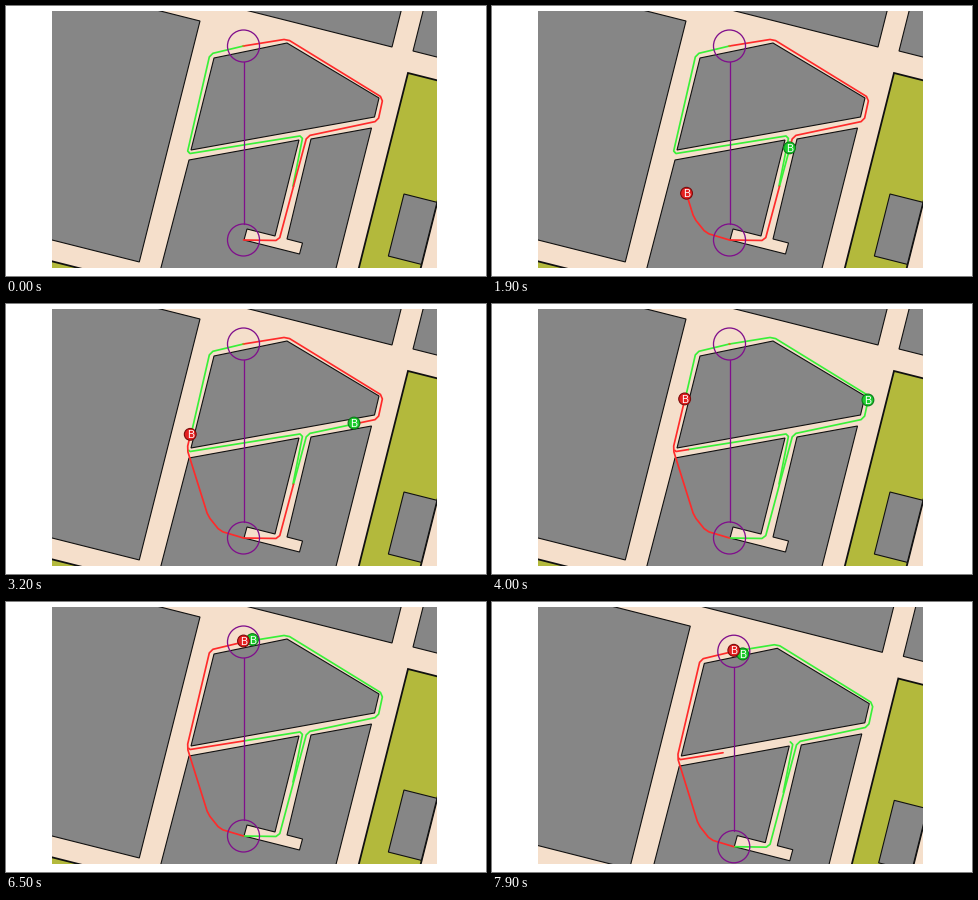
A matplotlib script that plays this animation: 480 by 270 pixels, repeating every 8 s.

```python
import numpy as np
import matplotlib.pyplot as plt
from matplotlib.animation import FuncAnimation
from matplotlib.patches import Circle, Polygon

W, H, DPI = 480, 270, 100
FRAMES, STEP = 80, 100
PX = 72 / DPI
LEFT, RIGHT, TOP, BOTTOM = 45.5, 430.5, 4.5, 262

ROAD, GRAY, OLIVE = "#f5dfcb", "#868686", "#b3b93c"
RED, GREEN, PURPLE = "#ff2a2a", "#38f038", "#800f8c"

# Seconds and pixels per second
START, REPAINT, PAN_START, PAN_TIME = 0.4, 3.6, 7.5, 0.4
RED_SPEED, SPUR_SPEED, SPUR_START = 45.5, 18, 3.2

# Axes of the tilted city grid
ANGLE = np.arctan(0.252)
EAST = np.array([np.cos(ANGLE), np.sin(ANGLE)])
SOUTH = np.array([-EAST[1], EAST[0]])


class Route:
    """Polyline with cut corners, addressed by distance from its start."""

    def __init__(self, corners, cut=3):
        corners = np.array(corners, float)
        points = [corners[0]]
        for before, corner, after in zip(corners, corners[1:], corners[2:]):
            for other in (before, after):
                way = other - corner
                points.append(corner + way * cut / np.hypot(*way))
        self.points = np.array(points + [corners[-1]])
        steps = np.hypot(*np.diff(self.points, axis=0).T)
        self.dist = np.concatenate([[0], np.cumsum(steps)])
        self.length = self.dist[-1]

    def at(self, d):
        return np.array([np.interp(d, self.dist, c) for c in self.points.T])

    def find(self, point):
        ds = np.linspace(0, self.length, 1500)
        x, y = self.at(ds)
        return ds[np.argmin(np.hypot(x - point[0], y - point[1]))]

    def part(self, a, b):
        inner = self.dist[(self.dist > a) & (self.dist < b)]
        return self.at(np.concatenate([[a], inner, [max(a, b)]]))


home, goal = (237.5, 234), (237.5, 40)
bend, junction, fork = (204, 48), (181, 148), (287, 180)
right = Route([home, (273, 234.5), (301, 130), (372, 115), (377, 92), (281, 33), goal])
left = Route([goal, bend, junction, (297, 129.5), fork])
shortcut = Route([home, (214, 227), (202, 212), (181, 145), bend, goal])
FORK, JUNCTION = right.find(fork), left.find(junction)

fig = plt.figure(figsize=(W / DPI, H / DPI), dpi=DPI, facecolor="white")
ax = fig.add_axes([LEFT / W, 1 - BOTTOM / H, (RIGHT - LEFT) / W, (BOTTOM - TOP) / H])
ax.set_facecolor(ROAD)
ax.set(xticks=[], yticks=[])
for side in ax.spines.values():
    side.set_visible(False)


def block(points, color=GRAY, width=1.1):
    ax.add_patch(Polygon(points, facecolor=color, edgecolor="#101010",
                         linewidth=width * PX))


def slab(corner, east, south, *style):
    """Rectangle on the city grid, spanned from one corner."""
    a, b = EAST * east, SOUTH * south
    block(np.array(corner) + [0 * a, a, a + b, b], *style)


def line(color, z, points=((), ()), width=1.7):
    return ax.plot(*points, color=color, lw=width * PX, zorder=z,
                   solid_capstyle="round", solid_joinstyle="round")[0]


slab((194, 15), -200, 248.5)
slab((140, 279), -130, 40, OLIVE, 1.8)
slab((386, 41), -250, -60)
slab((407, 45), 60, -60)
slab((402, 67), 60, 240, OLIVE, 1.8)
slab((398, 188), 34, 64)
block([(208, 52), (281, 37), (373, 92), (368.5, 111), (185, 144)])
block([(183, 154), (293, 134), (269, 230), (241, 223), (238, 234), (293.5, 248),
       (296.5, 237), (281, 233), (305, 133), (365.5, 122), (320.5, 300), (145, 300)])

west_green, street_green, right_green = (line(GREEN, 3) for _ in range(3))
right_back, right_ahead, street_red, trail = (line(RED, 4) for _ in range(4))

for center in (home, goal):
    ax.add_patch(Circle(center, 16, fill=False, ec=PURPLE, lw=1.3 * PX, zorder=6))
line(PURPLE, 6, ([home[0]] * 2, [home[1] - 16, goal[1] + 16]), 1.3)
ax.add_patch(Circle(goal, 1.1, color="#d08020", lw=0, zorder=6))


def make_ball(color, edge, z):
    disc = ax.add_patch(Circle((0, 0), 5.9, fc=color, ec=edge, lw=1.1 * PX, zorder=z))
    label = ax.text(0, 0, "B", color="white", fontsize=10.5 * PX, ha="center",
                    va="center_baseline", family="Liberation Sans", zorder=z + 0.5,
                    clip_on=True)
    return disc, label


green_ball = make_ball("#1ccc2c", "#0a7a18", 7)
red_ball = make_ball("#e42020", "#7a0c0c", 8)


def place(ball, pos, visible):
    disc, label = ball
    disc.center = pos
    label.set_position(pos)
    for part in ball:
        part.set_visible(visible)


def update(frame):
    t = frame * STEP / 1000
    pan = np.clip((t - PAN_START) / PAN_TIME, 0, 1)

    red_dist = np.clip(RED_SPEED * (t - START), 0, shortcut.length)
    green_dist = min(58 + 32 * t + 2.85 * t * t, right.length - 9)
    place(red_ball, shortcut.at(red_dist) - [0, 1], t >= START)
    place(green_ball, right.at(green_dist) + [0, 5 * pan - 1], t >= START)

    trail.set_data(*shortcut.part(0, red_dist))
    west_green.set_data(*left.part(0, min(JUNCTION, shortcut.length - red_dist)))

    reach = np.clip(SPUR_SPEED * (t - SPUR_START), 0, 56) - 11 * pan
    street_red.set_data(*left.part(JUNCTION, JUNCTION + reach))
    street_red.set_visible(reach > 0)
    street_start = left.length - 52 if pan > 0 else JUNCTION + reach
    street_green.set_data(*left.part(street_start, left.length))

    a, b = (FORK, max(FORK, green_dist)) if t < REPAINT else (0, right.length)
    right_green.set_data(*right.part(a, b))
    right_back.set_data(*right.part(0, a))
    right_ahead.set_data(*right.part(b, right.length))
    right_back.set_visible(t < REPAINT)
    right_ahead.set_visible(t < REPAINT)

    # The view slides at the end of the loop.
    ax.set_xlim(LEFT - 4.3 * pan, RIGHT - 4.3 * pan)
    ax.set_ylim(BOTTOM - 10.8 * pan, TOP - 9 * pan)
    return []


anim = FuncAnimation(fig, update, frames=FRAMES, interval=STEP, repeat=True,
                     repeat_delay=0, blit=False)
plt.show()
```
